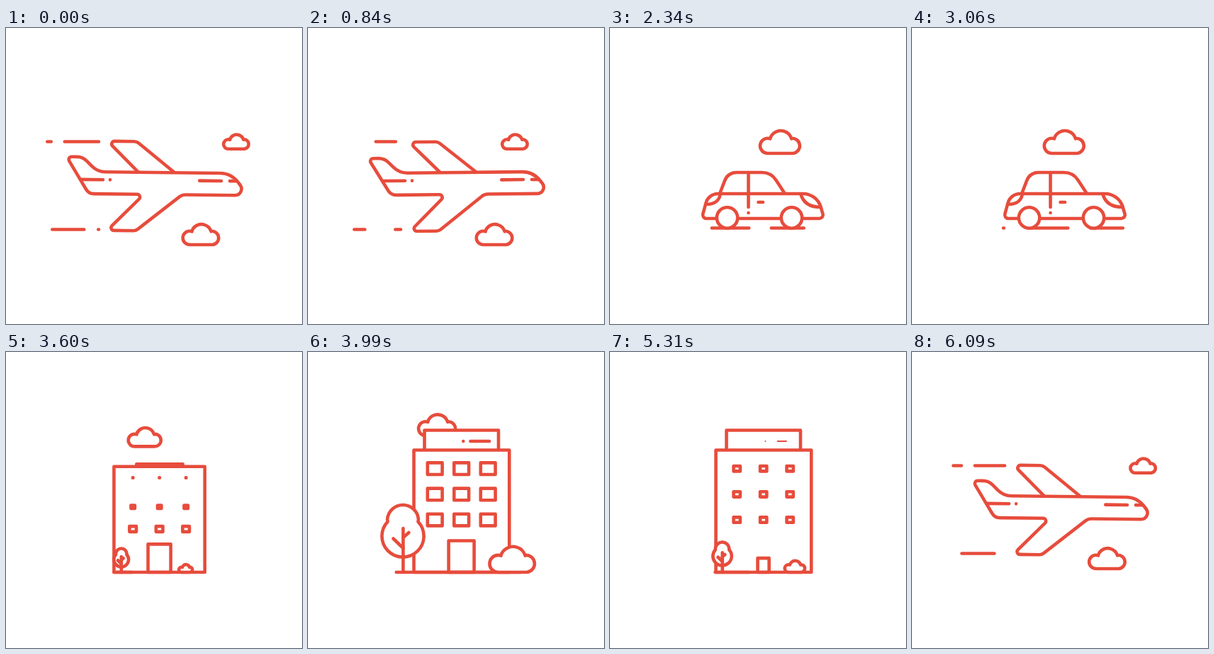
An HTML page with a canvas that plays this animation: 418 by 418 pixels, repeating every 6120 ms.

```html
<!DOCTYPE html>
<html lang="en">
<head>
<meta charset="utf-8">
<title>Plane, car, building</title>
<style>
  html, body { margin: 0; width: 100%; height: 100%; overflow: hidden; background: #fff; }
  canvas { display: block; width: 418px; height: 418px; }
</style>
</head>
<body>
<canvas id="stage"></canvas>
<script>
const LOOP = 6120, SIZE = 418, RED = '#e74c3c', STROKE = 4.6;
const SPEED = .2; // px per ms of the passing dashes
const canvas = document.getElementById('stage');
const ctx = canvas.getContext('2d');
const dpr = window.devicePixelRatio || 1;
canvas.width = canvas.height = SIZE * dpr;

const linear = p => p;
const easeIn = p => p * p;
const easeOut = p => 1 - (1 - p) ** 2;
const easeInOut = p => p < .5 ? 4 * p ** 3 : 1 - 4 * (1 - p) ** 3;
const backOut = p => 1 + 2.2 * (p - 1) ** 3 + 1.2 * (p - 1) ** 2;

const mix = (a, b, p) => Array.isArray(a) ? a.map((v, i) => mix(v, b[i], p)) : a + (b - a) * p;

// Keys are [time, value, easing into this key].
function track(t, keys) {
  if (t <= keys[0][0]) return keys[0][1];
  for (let i = 1; i < keys.length; i++) {
    const [t0, v0] = keys[i - 1], [t1, v1, ease = linear] = keys[i];
    if (t <= t1) return mix(v0, v1, ease((t - t0) / (t1 - t0)));
  }
  return keys[keys.length - 1][1];
}

// Grows from 0 to 1 after `start` and shrinks back after `end`.
const visible = (t, start, end, grow = 300, ease = easeOut) =>
  track(t, [[start, 0], [start + grow, 1, ease], [end, 1], [end + 230, 0, easeIn]]);

// Four-cornered body with spare points along its edges, so that it can morph into the plane.
function hull([tl, tr, br, bl], top, bottom, [r1, r2, r3, r4]) {
  const upper = p => [mix(tl, tr, p), top, 0], lower = p => [mix(br, bl, p), bottom, 0];
  return [[tl, top, r1], upper(.25), upper(.4), [tr, top, r2],
          [br, bottom, r3], ...[.25, .5, .65, .7].map(lower), [bl, bottom, r4]];
}
const block = (left, right, top) => hull([left, right, right, left], top, 311, [0, 0, 0, 0]);
const cap = ([bl, tl, tr, br], bottom, top, r1 = 0, r2 = 0) =>
  [[bl, bottom, 0], [tl, top, r1], [tr, top, r2], [br, bottom, 0]];

// Corners are [x, y, radius].
const BODY = {
  plane: [[85.3, 183, 4], [108, 183, 20], [129, 204, 28], [318, 204, 32], [342, 235, 9],
          [249, 235, 14], [184, 286.5, 10], [143.5, 286.5, 4], [195, 235, 4], [117, 235, 13]],
  squeeze: hull([150.5, 270, 292, 136.5], 211, 242.5, [6, 18, 7, 5]),
  car: hull([139, 292, 302.5, 129.5], 234, 269, [18, 26, 5, 5]),
  low: block(152.5, 280.7, 162),
  building: block(149.5, 284.3, 138.5)
};
const TOP = {
  plane: cap([187, 143, 184, 238], 204, 160.5, 4, 10),
  squeeze: cap([178, 191.5, 227.5, 244.5], 211, 181, 13, 14),
  car: cap([155, 166.5, 227.5, 247], 234, 204, 17, 24),
  low: cap([184.5, 184.5, 249.5, 249.5], 162, 158.7),
  building: cap([164.5, 164.5, 269, 269], 138.5, 110.5)
};
const morph = (t, s) => track(t, [
  [1290, s.plane], [1530, s.squeeze, easeIn], [1800, s.car, easeOut],
  [3300, s.car], [3600, s.low, easeIn], [3850, s.building, easeOut],
  [5330, s.building], [5665, s.plane, easeInOut]
]);

function paint() {
  ctx.fill();
  ctx.stroke();
}

function outline(pts, closed) {
  const n = pts.length, first = pts[0], last = pts[n - 1];
  ctx.beginPath();
  if (closed) ctx.moveTo((last[0] + first[0]) / 2, (last[1] + first[1]) / 2);
  else ctx.moveTo(first[0], first[1]);
  for (let i = closed ? 0 : 1; i < (closed ? n : n - 1); i++) {
    const [x, y, r] = pts[i], [px, py] = pts[(i + n - 1) % n], [nx, ny] = pts[(i + 1) % n];
    const ax = px - x, ay = py - y, bx = nx - x, by = ny - y;
    const half = Math.abs(Math.atan2(ax * by - ay * bx, ax * bx + ay * by)) / 2;
    const limit = Math.tan(half) * .55 * Math.min(Math.hypot(ax, ay), Math.hypot(bx, by));
    ctx.arcTo(x, y, nx, ny, Math.min(r, limit));
  }
  if (closed) ctx.closePath();
  else ctx.lineTo(last[0], last[1]);
  paint();
}

function line(x1, y1, x2 = x1 + .01, y2 = y1) {
  ctx.beginPath();
  ctx.moveTo(x1, y1);
  ctx.lineTo(x2, y2);
  ctx.stroke();
}

function curve(x, y, ...bezier) {
  ctx.beginPath();
  ctx.moveTo(x, y);
  ctx.bezierCurveTo(...bezier);
  ctx.stroke();
}

// Draws scaled around a point.
function pop(x, y, s, draw) {
  if (s <= .01) return;
  ctx.save();
  ctx.translate(x, y);
  ctx.scale(s, s);
  ctx.translate(-x, -y);
  draw();
  ctx.restore();
}

function cloud(x, bottom, w) {
  if (w < 1) return;
  const arc = (cx, cy, r, a, b) =>
    ctx.arc(x + cx * w, bottom + cy * w, r * w, a * Math.PI / 180, b * Math.PI / 180);
  ctx.beginPath();
  arc(-.31, -.19, .19, 90, 290);
  arc(.02, -.287, .283, 197, 343);
  arc(.31, -.19, .19, 264, 450);
  ctx.closePath();
  paint();
}

// A fixed line whose repeating dashes slide left; the pattern begins at `start` at time 0.
function slide(from, to, y, pattern, start, t) {
  if (to - from < 1) return;
  ctx.setLineDash(pattern);
  ctx.lineDashOffset = from + t * SPEED - start;
  line(from, y, to, y);
  ctx.setLineDash([]);
}

function clouds(t, tp) {
  if (t < 5100) {
    const x = track(t, [[0, 325], [840, 292], [1530, 274.5], [2340, 240], [4620, 160], [5100, 143]]);
    const [w, bottom] = track(t, [
      [1275, [35.5, 170.8]], [1530, [78, 183], easeOut], [1800, [56, 177], easeInOut],
      [3270, [56, 177]], [3600, [46, 133.5], easeIn], [3790, [52, 118], easeOut],
      [4820, [52, 118]], [5075, [0, 103], easeIn]
    ]);
    cloud(x, bottom, w);
  } else {
    const s = visible(t, 5330, LOOP);
    cloud(325 - tp * .039, 160.7 + 10.1 * s, 35.5 * s);
  }
  const big = track(tp, [[-600, 0], [-330, 1, easeOut], [1275, 1], [1530, .08, easeOut], [1570, 0]]);
  cloud(275 - tp * .0142, 291.5 + 14.5 * big, 50.5 * big);
}

function speedLines(tp) {
  const enter = track(tp, [[-500, 0], [-250, 1, easeOut]]);
  const s = track(tp, [[1290, 1], [1530, 0]]);
  const lineAt = (from, to, y, pattern, start) =>
    pop(98, y, s, () => slide(mix(to, from, enter), to, y, pattern, start, tp));
  lineAt(58.3, 131, 160.5, [28, 19, 143, 38], 36);
  lineAt(65.3, 131, 284.5, [46, 20, 118, 43], 64.5);
}

function plane(t, tp) {
  const s = visible(tp, -520, 1270);
  pop(147, 215, s, () => line(147, 215));
  pop(289, 215, s, () => line(273.3, 215, 304, 215));
  pop(322, 215, s, () => line(316, 215, 326, 215));

  // The stripe on the tail turns into the door handle of the car.
  const [x1, x2, y] = track(tp, [
    [1290, [105, 137, 215]], [1530, [193.7, 196.5, 222.6], easeIn], [1800, [209.5, 216, 246], easeOut]]);
  pop((x1 + x2) / 2, y, visible(tp, -520, 3190), () => line(x1, y, x2, y));
}

function car(t, base) {
  const s = visible(t, 1600, 3190);
  pop(195.5, 234, s, () => {
    line(195.5, 204, 195.5, 253);
    line(195.5, 261);
  });
  pop(284, 244, s, () => curve(269.5, 235, 273, 247, 283, 253, 297.5, 253));
  pop(146, 242, s, () => curve(136.3, 249, 148, 249, 154, 243, 155.5, 236));
  const half = 86 * s;
  slide(215 - half, 215 + half, 282.5, [52.5, 31.5, 46, 38], 144, t - 2340);

  const wheel = visible(t, 1550, 3190, 300, backOut);
  for (const x of [165.5, 256.5]) pop(x, base - 1, wheel, () => {
    ctx.beginPath();
    ctx.arc(x, base - 1, 14.7, 0, Math.PI * 2);
    paint();
  });
}

function tree(x, base, s) {
  if (s < .03) return;
  const px = v => x + v * s, py = v => base + v * s;
  ctx.beginPath();
  ctx.arc(px(-.4), py(-73), 22 * s, Math.PI * 1.02, Math.PI * 1.98);
  ctx.arc(px(-.4), py(-51), 29.6 * s, -.76, Math.PI + .76);
  ctx.closePath();
  paint();
  line(x, py(-62), x, base);
  line(px(-14), py(-47.5), x, py(-34));
  line(x, py(-49), px(8), py(-56));
}

function building(t, base) {
  const END = 5140;
  const rise = track(t, [[3600, 1], [3850, 0, easeOut]]);
  for (let row = 0; row < 3; row++) {
    const s = visible(t, 3596 - 51 * row, END, 400);
    if (s < .005) continue;
    const y = 164.7 + 36.2 * row + rise * (18 - 5 * (row - 1) ** 2);
    const w = 20.8 * s, h = 16.6 * s;
    for (let col = 0; col < 3; col++)
      ctx.strokeRect(179.2 + 37.5 * col - w / 2, y - h / 2, w, h);
  }

  const door = visible(t, 3400, END);
  if (door > .02) ctx.strokeRect(216.6 - 18 * door, base - 44.5 * door, 36 * door, 44.5 * door);

  const sign = visible(t, 3740, END);
  pop(219.5, 126, sign, () => line(219.3, 126));
  pop(243, 126, sign, () => line(229, 126, 256.5, 126));

  // Plants spread outwards as they grow.
  const grow = visible(t, 3511, END, 460), left = 1 - grow;
  const bush = visible(t, 3526, END, 460);
  if (grow > .2) line(124.7 + 43 * left, base, 300 - 188 * left, base);
  tree(134.4 + 44 * left, base, grow);
  cloud(288.2 - 49.3 * (1 - bush), base, 63.5 * bush);
}

function render(now) {
  const t = now % LOOP;
  const tp = t > 5000 ? t - LOOP : t; // signed time around the plane scene
  ctx.setTransform(dpr, 0, 0, dpr, 0, 0);
  ctx.fillStyle = '#fff';
  ctx.fillRect(0, 0, SIZE, SIZE);
  ctx.strokeStyle = RED;
  ctx.lineWidth = STROKE;
  ctx.lineCap = ctx.lineJoin = 'round';

  clouds(t, tp);
  speedLines(tp);

  const body = morph(t, BODY), base = body[9][1];
  const sway = visible(tp, -780, 1290);
  ctx.save();
  ctx.translate(210, 215);
  ctx.rotate(.0105 * sway * Math.cos(t / 1530 * Math.PI * 2));
  ctx.translate(-210, -215);
  outline(morph(t, TOP), false);
  outline(body, true);
  plane(t, tp);
  ctx.restore();

  car(t, base);
  building(t, base);
}

function loop() {
  render(performance.now());
  requestAnimationFrame(loop);
}
loop();
</script>
</body>
</html>
```
